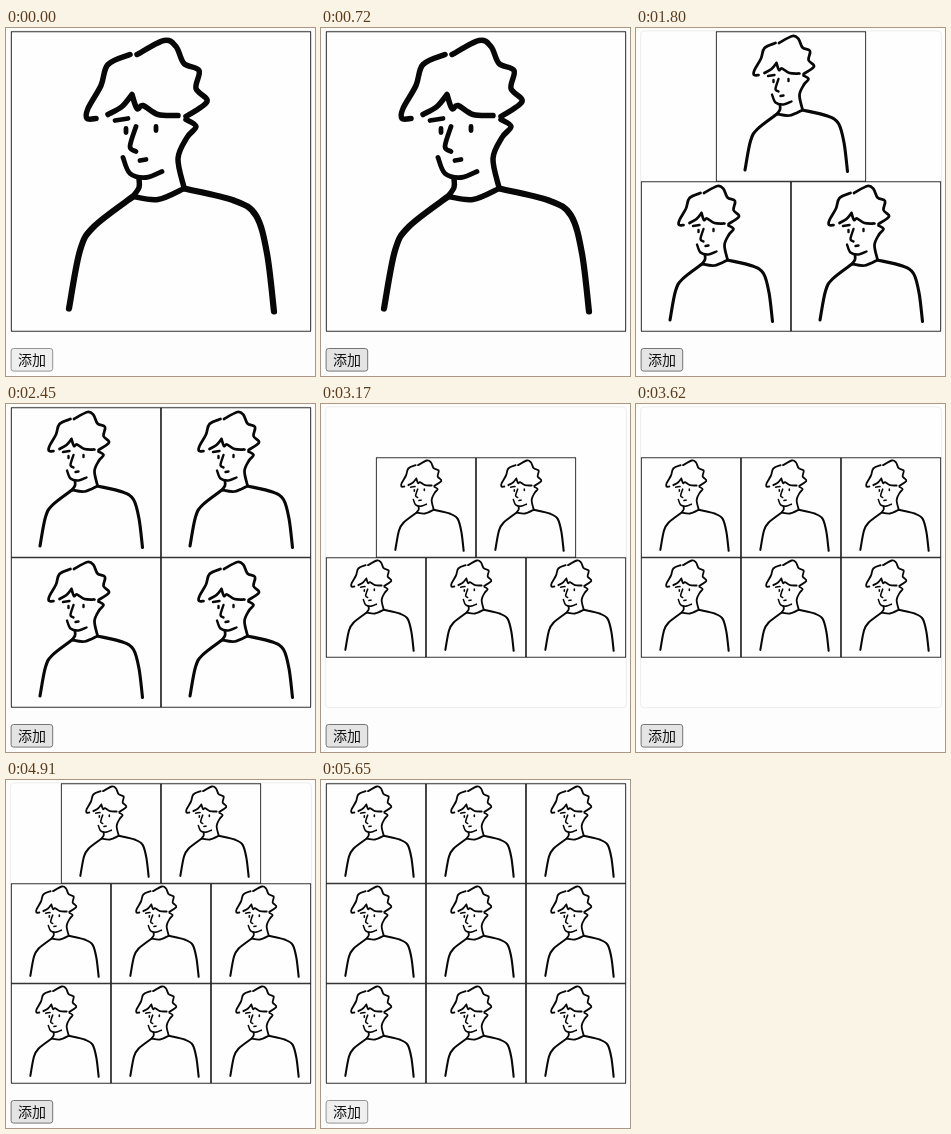
Recreate the animation shown at these times as an HTML page. Size 309x348 px, loop 6.46 s.

```html
<!DOCTYPE html>
<html lang="zh">
<head>
<meta charset="utf-8">
<title>添加</title>
<style>
  html, body { margin: 0; width: 100%; height: 100%; overflow: hidden; background: #fdfdfd; }
  svg { display: block; }
  text { font: 14px "Noto Sans CJK SC", "Noto Sans CJK", "Noto Sans", sans-serif; fill: #111; }
  #person { fill: none; stroke: #080808; stroke-linecap: round; stroke-linejoin: round; }
  #button { stroke-width: 0.9; }
  .idle { fill: #efefef; stroke: #8a8a8a; }
  .hover { fill: #e4e4e4; stroke: #686868; }
  .press { fill: #f5f5f5; stroke: #8d8d8d; }
</style>
</head>
<body>
<svg width="309" height="348" viewBox="0 0 309 348">
  <defs><g id="person" transform="translate(-5 -3)"></g></defs>
  <rect x="4.6" y="2.9" width="300.8" height="300.8" rx="4" fill="#fefefe" stroke="#e9e9e9" stroke-width="0.8"/>
  <g id="tiles"></g>
  <rect id="button" x="5.1" y="320.5" width="41.6" height="22.6" rx="2.5"/>
  <text x="26" y="337" text-anchor="middle">添加</text>
</svg>
<script>
const NS = "http://www.w3.org/2000/svg";
const LOOP = 6460, BOX = 300, LEFT = 5, TOP = 3.5;
const HOVER_IN = 450, HOVER_OUT = 5650, HOLD = 100;
const releases = [1260, 1800, 2450, 3170, 3620, 4190, 4910, 5380];

const byId = id => document.getElementById(id);
const [person, tiles, button] = ["person", "tiles", "button"].map(byId);

function add(parent, tag, attrs) {
  const el = document.createElementNS(NS, tag);
  for (const key in attrs) el.setAttribute(key, attrs[key]);
  return parent.appendChild(el);
}

// Smooth curve through a few key points (Catmull-Rom to Bezier).
function smooth(text) {
  const pts = text.split(" ").map(p => p.split(",").map(Number));
  const at = i => pts[Math.max(0, Math.min(pts.length - 1, i))];
  let d = "M" + pts[0];
  for (let i = 0; i < pts.length - 1; i++) {
    const [a, b, c, e] = [at(i - 1), at(i), at(i + 1), at(i + 2)];
    const c1 = b.map((v, k) => v + (c[k] - a[k]) / 6);
    const c2 = c.map((v, k) => v - (e[k] - b[k]) / 6);
    d += `C${c1} ${c2} ${c}`;
  }
  return d;
}

function strokes(width, ...curves) {
  add(person, "path", { d: curves.map(smooth).join(""), "stroke-width": width });
}

function drawPerson() {
  const hair = ["124,26 102,36 95,57 82,80 81,90 90,90",
                "131,26 158,12 170,18 178,35 193,42 190,60 201,73 180,88"];
  const fringe = ["102,86 116,78 126,66", "126,66 131,80 137,77 152,86 172,87"];
  const neck = ["180,91 190,98 181,109 172,130 178,159",
                "133,150 133,159 127,168", "127,168 152,171 178,160"];
  const arms = ["127,168 88,198 74,222 63,280", "178,160 228,172 250,187 261,225 268,283"];
  const face = ["117,129 124,145 140,149 156,143", "109,92 122,90",
                "120,100 120,104", "150,98 150,102",
                "130,98 124,118 130,123", "134,132 140,131"];
  strokes(5.5, ...hair, ...fringe, ...neck);
  strokes(6.2, ...arms);
  strokes(4.8, ...face);
}

// Rows fill from the bottom; a short row sits centred on top.
function layout(count) {
  const cols = Math.ceil(Math.sqrt(count));
  const rows = Math.ceil(count / cols);
  const size = BOX / cols;
  const bottom = TOP + (BOX + rows * size) / 2;
  tiles.replaceChildren();
  for (let i = 0; i < count; i++) {
    const row = Math.floor(i / cols);
    const inRow = Math.min(cols, count - row * cols);
    const x = LEFT + (BOX - inRow * size) / 2 + (i % cols) * size;
    const y = bottom - (row + 1) * size;
    const tile = add(tiles, "g", { transform: `translate(${x} ${y})` });
    add(tile, "rect", { x: 0.3, y: 0.3, width: size - 0.6, height: size - 0.6,
                        fill: "#fefefe", stroke: "#000", "stroke-width": 0.8 });
    add(tile, "use", { href: "#person", transform: `scale(${size / BOX})` });
  }
}

let shown = 0;
function draw(time) {
  const count = 1 + releases.filter(up => time >= up).length;
  if (count !== shown) layout(shown = count);
  const pressed = releases.some(up => time >= up - HOLD && time < up);
  const hovered = time >= HOVER_IN && time < HOVER_OUT;
  button.setAttribute("class", pressed ? "press" : hovered ? "hover" : "idle");
}

drawPerson();
const start = performance.now();
function tick() {
  draw((performance.now() - start) % LOOP);
  requestAnimationFrame(tick);
}
tick();
</script>
</body>
</html>
```
